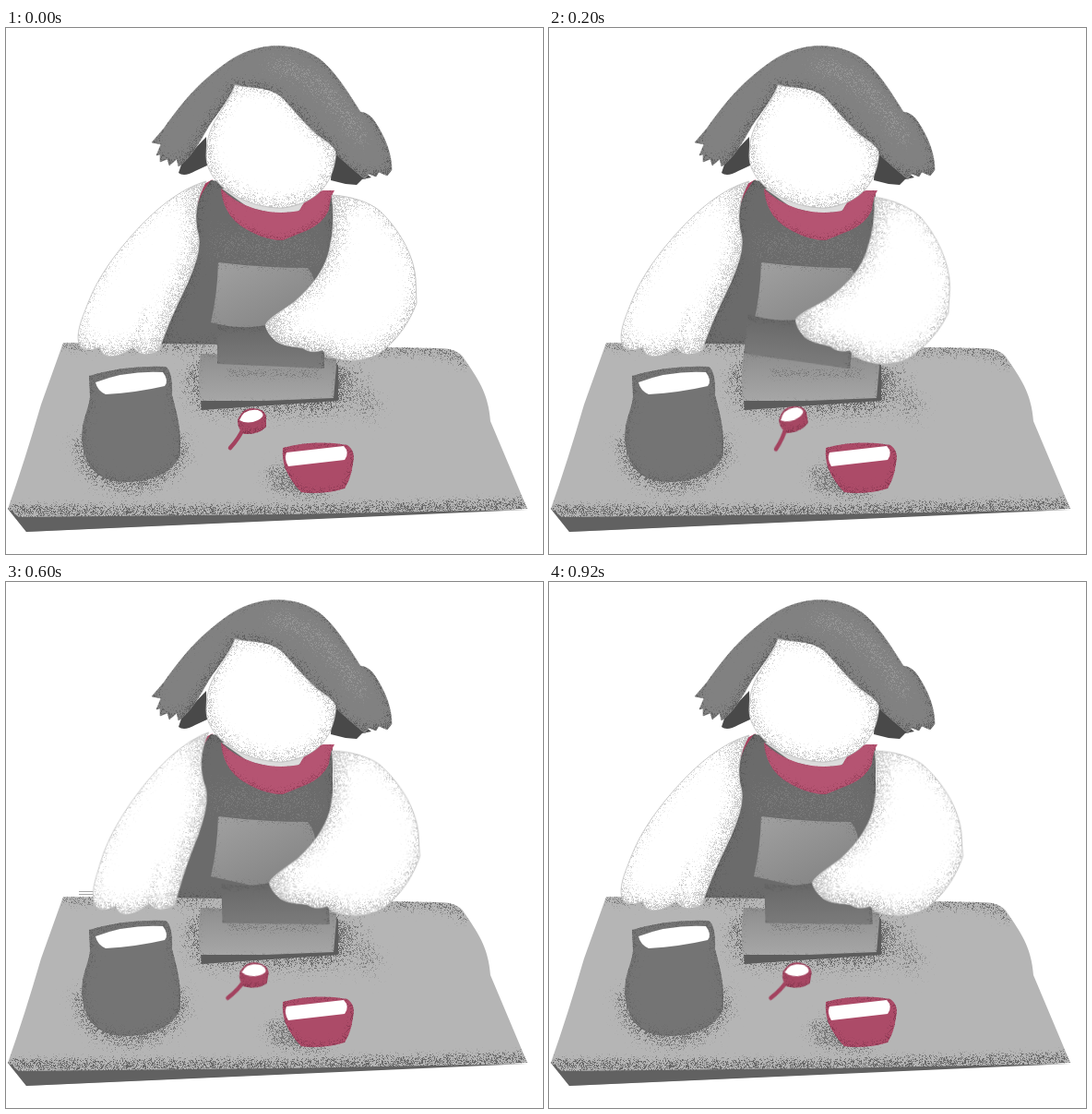
Animation of 582 by 570 pixels, one loop 1 s. Source, as an HTML page with a canvas:

```html
<!DOCTYPE html>
<html lang="en">
<head>
<meta charset="utf-8">
<title>Weighing flour</title>
<style>
html, body { margin: 0; width: 100%; height: 100%; overflow: hidden; background: #fff; }
canvas { display: block; width: 582px; height: 570px; }
</style>
</head>
<body>
<canvas id="stage" width="582" height="570"></canvas>
<script>
const W = 582, H = 570, STEP = 200;

function canvas2d(options) {
  const c = document.createElement('canvas');
  c.width = W;
  c.height = H;
  return c.getContext('2d', options);
}

let seed = 4271;
const noise = Float32Array.from({ length: W * H }, () => {
  seed = (seed * 16807) % 2147483647;
  return seed / 2147483647 * 255;
});

const mask = canvas2d({ willReadFrequently: true });
let g;

// Turns a blurred drawing into grain: the denser the blur, the more dots.
function scatter(clip, blur, amount, draw) {
  mask.clearRect(0, 0, W, H);
  mask.save();
  mask.filter = `blur(${blur}px)`;
  draw();
  mask.restore();
  const image = mask.getImageData(0, 0, W, H), px = image.data;
  for (let i = 0; i < noise.length; i++) {
    const a = i * 4 + 3;
    px[a] = (px[a] * amount - noise[i]) * 4;
  }
  mask.putImageData(image, 0, 0);
  g.save();
  g.clip(clip);
  g.drawImage(mask.canvas, 0, 0);
  g.restore();
}

// Grain inside the outline; a shift thickens it on the opposite side.
function edge(path, color, blur, dx = 0, dy = 0, amount = 1) {
  scatter(path, blur, amount, () => {
    const outside = new Path2D();
    outside.rect(-W, -H, 3 * W, 3 * H);
    outside.addPath(path);
    mask.translate(dx, dy);
    mask.fillStyle = color;
    mask.fill(outside, 'evenodd');
  });
}

// Grain along a brush stroke.
function brush(path, d, width, blur, color, amount = 1) {
  scatter(path, blur, amount, () => {
    mask.strokeStyle = color;
    mask.lineWidth = width;
    mask.lineCap = mask.lineJoin = 'round';
    mask.stroke(new Path2D(d));
  });
}

function part(d, fill, outline) {
  const path = new Path2D(d);
  g.fillStyle = fill;
  g.fill(path);
  if (outline) {
    g.strokeStyle = outline;
    g.lineWidth = 0.7;
    g.stroke(path);
  }
  return path;
}

function fade(x0, y0, x1, y1, from, to) {
  const f = g.createLinearGradient(x0, y0, x1, y1);
  f.addColorStop(0, from);
  f.addColorStop(1, to);
  return f;
}

function layer(...draws) {
  g = canvas2d();
  draws.forEach(draw => draw());
  return g.canvas;
}

function body() {
  part('M213 170L224 164L206 198Q205 182 213 170Z', '#a9405f');
  const apron = part('M222 165Q206 186 205 204Q212 240 197 276L166 343H340L354 240V178Z', '#6b6b6b');
  edge(apron, '#555', 9, 0, 0, 0.8);
  brush(apron, 'M235 235L330 242', 35, 14, '#7b7b7b', 0.5);
  part('M234 174H330L326 190L316 199L290 201L262 194Z', '#dcdcdc');
  const scarf = part('M233 174Q246 188 270 196Q295 203 318 198Q327 179 344 176H356'
    + 'Q351 184 350 197Q344 211 327 219L300 230Q278 230 254 214Q235 200 233 174Z', '#b55472');
  edge(scarf, '#99415c', 5, -1, -3, 0.7);
}

function head() {
  for (const d of ['M217 118L191 145L187 157Q193 162 205 155L218 149Z',
    'M354 132L396 162L386 164L380 170L368 169L352 165Z']) part(d, '#494949');
  const face = part('M248 62C268 66 284 62 300 76C318 96 332 116 358 131'
    + 'C357 165 340 190 300 195C262 196 214 170 217 135C218 100 240 88 248 62Z', '#fff', '#b0b0b0');
  edge(face, '#c6c6c6', 11, 0, -3);
  const hair = part('M158 124L171 109C195 75 212 57 240 37C272 14 318 13 345 38'
    + 'C360 52 372 72 384 91Q394 92 400 102C412 120 418 138 418 154L413 160L404 156L401 161'
    + 'L393 158L389 164Q372 150 358 137C358 130 350 124 338 116C322 102 310 86 300 76'
    + 'C285 62 265 66 248 61C240 82 225 96 217 111C208 127 198 143 187 150L185 142L177 149'
    + 'L175 142L167 145V137L163 138L168 126Z', '#818181', '#8a8a8a');
  edge(hair, '#616161', 7, -2, -3, 0.9);
  brush(hair, 'M245 62Q300 58 358 135', 7, 6, '#606060', 0.8);
  brush(hair, 'M290 40Q345 50 385 120', 14, 9, '#969696', 0.7);
}

function table() {
  const top = part('M62 341L170 342L470 347Q490 347 497 359C510 378 523 395 525 426'
    + 'L565 521L22 546L2 521Q20 470 38 408Z', '#b5b5b5');
  brush(top, 'M0 524L300 524L566 517', 7, 6, '#666', 1.2);
  g.fillStyle = '#616161';
  g.fill(new Path2D('M2 521L22 546L565 522L300 527L14 530Z'));
  brush(top, 'M62 340L220 344M360 346L470 348L500 362', 8, 7, '#707070');
  brush(top, 'M92 455Q100 484 135 484T180 455', 30, 11, '#707070', 0.9);
  brush(top, 'M225 385L350 385', 50, 14, '#666');
  brush(top, 'M365 375L395 415', 15, 12, '#777', 0.8);
  brush(top, 'M295 488L340 496', 22, 10, '#777');
}

function tray() {
  part('M209 382L212 414L360 404V365Z', '#5c5c5c');
  const plate = part('M211 353L358 358V367L355 401L280 404H210Q207 380 211 353Z',
    fade(0, 353, 0, 403, '#8e8e8e', '#a6a6a6'));
  edge(plate, '#7c7c7c', 4, 0, 2, 0.6);
  brush(plate, 'M240 374L340 374', 5, 5, '#777', 0.8);
  const pocket = part('M230 254Q280 260 327 260Q336 270 336 290L300 324Q275 332 262 328L222 319Q229 290 230 254Z',
    fade(245, 255, 285, 330, '#9e9e9e', '#868686'));
  edge(pocket, '#757575', 6, -2, 0, 0.6);
}

function block() {
  const box = part('M229 321Q262 328 290 320L345 340V369L229 364Z',
    fade(0, 320, 0, 370, '#676767', '#7c7c7c'));
  edge(box, '#5c5c5c', 5, -2, 3, 0.6);
}

function leftArm() {
  const arm = part('M217 166C190 174 160 195 125 238C98 272 92 290 85 308C74 335 76 350 92 349'
    + 'L102 346C104 360 122 358 138 346C142 354 155 356 166 349C176 320 185 300 197 276'
    + 'C208 250 210 240 209 226C203 205 206 186 217 166Z', '#fff', '#b5b5b5');
  edge(arm, '#cfcfcf', 13, -5, -4, 1.1);
  edge(arm, '#c6c6c6', 6, -2, -5);
  brush(arm, 'M139 348L152 305', 5, 5, '#c8c8c8', 0.8);
}

function rightArm() {
  const arm = part('M353 181C372 182 393 188 405 198C425 217 442 245 444 272L445 298'
    + 'C437 320 425 335 412 347C395 362 370 364 348 355L343 349C335 352 327 351 322 347'
    + 'C312 345 300 345 292 339Q283 331 281 322C284 314 300 306 312 297'
    + 'C332 280 347 260 351 237Q357 212 353 181Z', '#fff', '#adadad');
  edge(arm, '#cbcbcb', 14, 5, -4, 1.2);
  edge(arm, '#c2c2c2', 6, 1, -5);
}

function jar() {
  const pot = part('M90 377Q130 365 173 367Q181 372 180 398C186 420 190 435 189 462'
    + 'C180 486 150 492 130 492C95 492 84 470 82 445C82 425 90 412 91 400Z', '#747474');
  edge(pot, '#616161', 9, 0, 0, 0.8);
  part('M97 384Q130 371 170 373Q177 382 172 388Q142 395 108 397Q99 393 97 384Z', '#fff');
}

function bowl() {
  const cup = part('M300 455Q335 446 370 452Q379 458 376 472Q374 488 367 499Q345 506 320 503'
    + 'Q309 492 303 478Q299 468 300 455Z', '#ac4b68');
  edge(cup, '#863750', 6, 0, -1, 0.8);
  part('M304 460L366 453Q373 460 367 468L306 475Q301 467 304 460Z', '#fff');
}

function spoon() {
  g.strokeStyle = '#a3425f';
  g.lineWidth = 4.5;
  g.lineCap = 'round';
  g.stroke(new Path2D('M257 434Q253 444 243 455'));
  const cup = part('M251 425Q256 412 268 412Q281 413 282 421V432Q274 441 258 440Q251 435 251 425Z', '#a64763');
  edge(cup, '#83354d', 4, 0, -2, 0.8);
  part('M253 425Q258 412 273 414Q284 419 273 425Q262 430 253 425Z', '#fff');
}

const art = {
  back: layer(body, head, table, tray),
  hand: layer(block, rightArm),
  lean: layer(leftArm),
  front: layer(jar, bowl),
  spoon: layer(spoon)
};

// Radians per pose.
const swing = [0, 0.1, -0.036, -0.03, -0.03];
const tilt = [0, -0.16, 0.17, 0.17, 0.17];
const leaning = 3;

const stage = document.getElementById('stage').getContext('2d');

function place(image, angle = 0, px = 0, py = 0, dx = 0, dy = 0) {
  stage.save();
  stage.translate(px + dx, py + dy);
  stage.rotate(angle);
  stage.drawImage(image, -px, -py);
  stage.restore();
}

function show(time) {
  const pose = Math.floor(time / STEP) % swing.length;
  const arm = swing[pose], dip = tilt[pose];
  stage.fillStyle = '#fff';
  stage.fillRect(0, 0, W, H);
  place(art.back);
  place(art.hand, arm, 352, 180, 0, arm ? 2 : 0);
  if (pose === leaning) {
    stage.fillStyle = '#a5a5a5';
    for (const y of [335, 338]) stage.fillRect(79, y, 17, 1);
    place(art.lean, -0.078, 215, 150, 1.5, -3);
  } else {
    place(art.lean);
  }
  place(art.front);
  place(art.spoon, dip, 266, 426, dip * 12, Math.min(0, dip * 12));
  requestAnimationFrame(show);
}
show(0);
</script>
</body>
</html>
```
